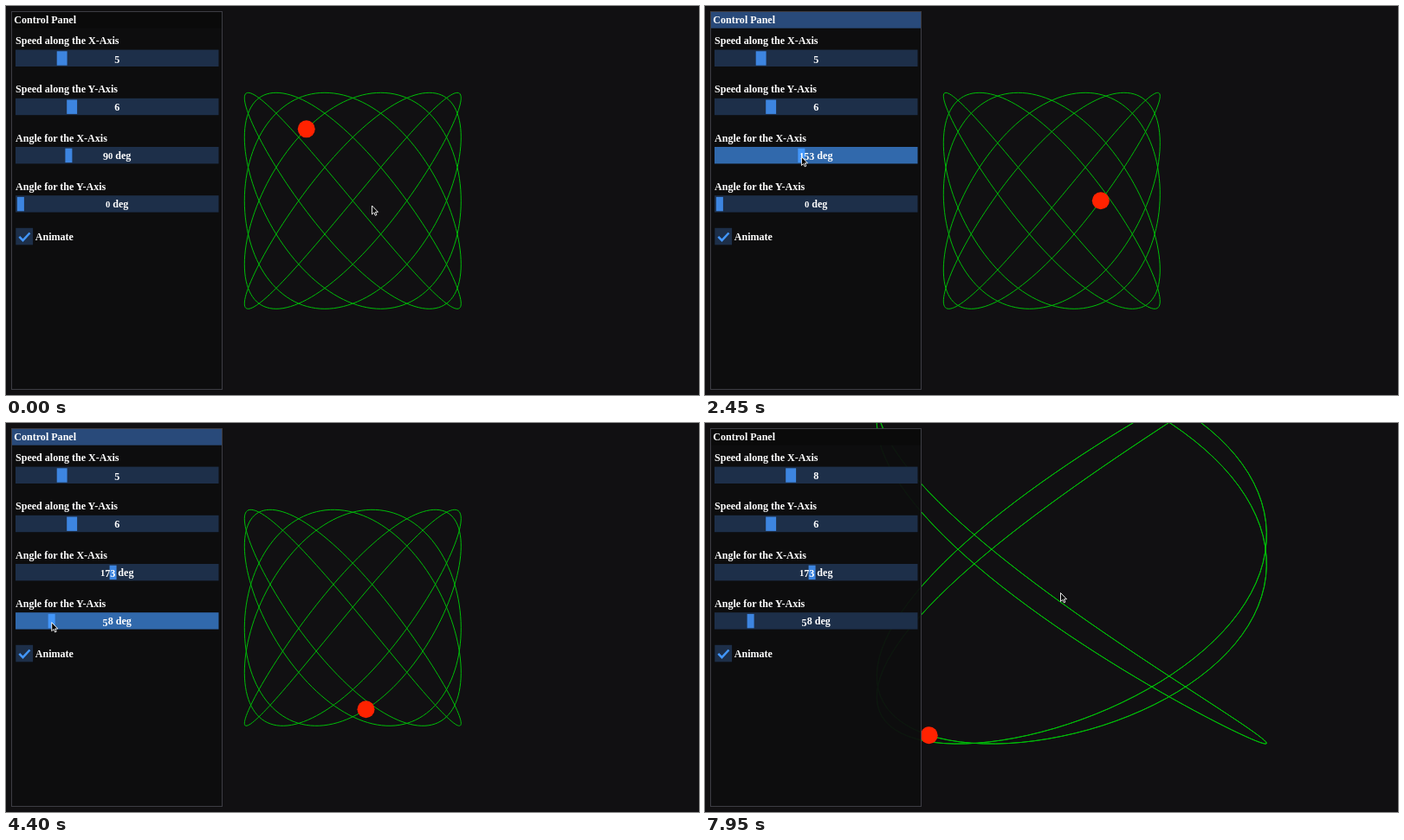
Animation, 800 px wide and 450 px high, one loop 8000 ms. Source, as an HTML page:

```html
<!DOCTYPE html>
<html>
<head>
<meta charset="utf-8">
<style>
html, body { margin: 0; width: 100%; height: 100%; overflow: hidden; background: #111012; }
svg { display: block; width: 800px; height: 450px; }
text { font: bold 12.05px "Liberation Serif", "Times New Roman", serif; fill: #fff; white-space: pre; }
</style>
</head>
<body>
<svg id="stage" viewBox="0 0 800 450"></svg>
<script>
const LOOP = 8000, STEP = 50, SPEED = 0.0006, RAD = Math.PI / 180;
const PAUSE = 690, CHANGE = 1750, RESUME = 6132, BLUR = 6970;
const stage = document.getElementById('stage');

const clamp = (v, lo, hi) => Math.min(hi, Math.max(lo, v));
const mix = (a, b, p) => a + (b - a) * p;
function ease(t, from, to) {
  const p = clamp((t - from) / (to - from), 0, 1);
  return p * p * (3 - 2 * p);
}
function set(el, attrs) {
  for (const k in attrs) el.setAttribute(k, attrs[k]);
}
function add(tag, attrs, text) {
  const el = document.createElementNS('http://www.w3.org/2000/svg', tag);
  set(el, attrs);
  if (text) el.textContent = text;
  return stage.appendChild(el);
}

const curve = add('path', { fill: 'none', stroke: '#00be08', 'stroke-width': 1 });
const ball = add('circle', { r: 10, fill: '#ff2200' });

add('rect', { x: 6.5, y: 6.5, width: 243, height: 437, fill: '#0d0d0e', 'fill-opacity': 0.94, stroke: '#3d3d44' });
const title = add('rect', { x: 7, y: 7, width: 242, height: 18.7 });
add('text', { x: 9.3, y: 20.4 }, 'Control Panel');

const rowTop = i => 50.6 + i * 56.2;
const isAngle = i => i > 1;
// Centre of a slider's grab for a value.
const grabX = (i, v) => isAngle(i) ? 17 + 222 * v / 360 : 18.75 + (v - 1) * 11.5;

const sliders = ['Speed along the X-Axis', 'Speed along the Y-Axis', 'Angle for the X-Axis', 'Angle for the Y-Axis']
  .map((label, i) => {
    const top = rowTop(i), width = isAngle(i) ? 8 : 11.9;
    add('text', { x: 11, y: top - 6.4 }, label);
    return {
      top, width,
      bar: add('rect', { x: 11, y: top, width: 234.5, height: 19.4 }),
      grab: add('rect', { y: top + 1.7, width, height: 16.4 }),
      text: add('text', { x: 128.2, y: top + 14.2, 'text-anchor': 'middle' })
    };
  });

add('rect', { x: 11.3, y: 256.8, width: 19.8, height: 19.5, fill: '#1d2f49' });
add('path', { d: 'M15.3 266.8l4.2 4.3 8-8.6', fill: 'none', stroke: '#4296fa', 'stroke-width': 2.5 });
add('text', { x: 33.8, y: 270.6 }, 'Animate');
const cursor = add('path', {
  d: 'M0 0V10l2.3-2.1 1.5 3.4 1.6-.7-1.5-3.3h3.1z',
  fill: '#050505', stroke: '#fff', 'stroke-width': 0.9
});

// Old-style figures: some hang below the line, some are low.
function showValue(el, value) {
  if (el.dataset.value === value) return;
  el.dataset.value = value;
  let shift = 0;
  el.innerHTML = [...value].map(c => {
    const drop = '34579'.includes(c) ? 1.2 : 0, dy = drop - shift;
    shift = drop;
    const size = '012'.includes(c) ? ' style="font-size:10.5px"' : '';
    return `<tspan dy="${dy}"${size}>${c}</tspan>`;
  }).join('');
}

// Slider values as the hand drags them.
const valuesAt = t => [
  clamp(5 + (t - 5200) * 0.0069, 5, 8),
  6,
  t < CHANGE ? 90 : Math.min(173, 95 + (t - CHANGE) * 0.083),
  86 * Math.sin(clamp((t - 3350) / 412, 0, 2.402))
];

function draggedAt(t) {
  if (t >= 1700 && t < 2900) return 2;
  if (t >= 3350 && t < 4450) return 3;
  if (t >= 5200 && t < 5850) return 0;
  return -1;
}

// The pointer glides from one place to the next and follows the grabs.
function mouseAt(t, values) {
  const on = i => [grabX(i, values[i]), rowTop(i) + 11.5];
  const glides = [
    [450, 900, on(0)], [1100, 1650, on(2)], [2950, 3300, on(3)],
    [4500, 5100, on(0)], [5850, 6480, [440.5, 276]], [BLUR, 7900, [410.5, 196.5]]
  ];
  return glides.reduce((pos, [from, to, goal]) => {
    const p = ease(t, from, to);
    return pos.map((v, k) => mix(v, goal[k], p));
  }, [422.5, 231]);
}

// The figure is pulled up, then zoomed.
function viewAt(t) {
  const zoomed = ease(t, 7350, 7600), zoom = 1 + 0.8 * zoomed;
  return [400.3 + 23 * zoomed, 225.3 - 44 * zoom * ease(t, BLUR, 7280), 125 * zoom];
}

function phaseAt(t) {
  return t < CHANGE ? -23.07 * RAD + SPEED * Math.min(t, PAUSE) : SPEED * Math.max(0, t - RESUME);
}

function draw(t) {
  const values = valuesAt(t);
  const [mx, my] = mouseAt(t, values);
  const [cx, cy, r] = viewAt(t);
  const drag = draggedAt(t);
  values[0] = Math.round(values[0]);
  const [sx, sy, ax, ay] = values;
  const point = a => [cx + r * Math.sin(sx * a + ax * RAD), cy + r * Math.sin(sy * a + ay * RAD)];

  let d = '';
  for (let i = 0; i < 720; i++) {
    d += (i ? 'L' : 'M') + point(i * RAD / 2).map(v => v.toFixed(2)).join(' ');
  }
  curve.setAttribute('d', d + 'Z');
  const [bx, by] = point(phaseAt(t));
  set(ball, { cx: bx, cy: by });

  title.setAttribute('fill', t >= 1700 && t < BLUR ? '#294a7a' : '#0a0a0a');
  sliders.forEach((s, i) => {
    const active = drag === i;
    const hover = drag < 0 && mx > 11 && mx < 245 && my > s.top && my < s.top + 19.4;
    s.bar.setAttribute('fill', active ? '#3169ac' : hover ? '#23456d' : '#1d2f49');
    set(s.grab, {
      x: grabX(i, values[i]) - s.width / 2 - 0.1,
      fill: active ? '#4296fa' : '#3d85e0'
    });
    showValue(s.text, Math.round(values[i]) + (isAngle(i) ? ' deg' : ''));
  });
  cursor.setAttribute('transform', `translate(${mx} ${my})`);
}

const start = performance.now();
function tick() {
  const t = (performance.now() - start) % LOOP;
  draw(Math.floor(t / STEP) * STEP);
  requestAnimationFrame(tick);
}
tick();
</script>
</body>
</html>
```
